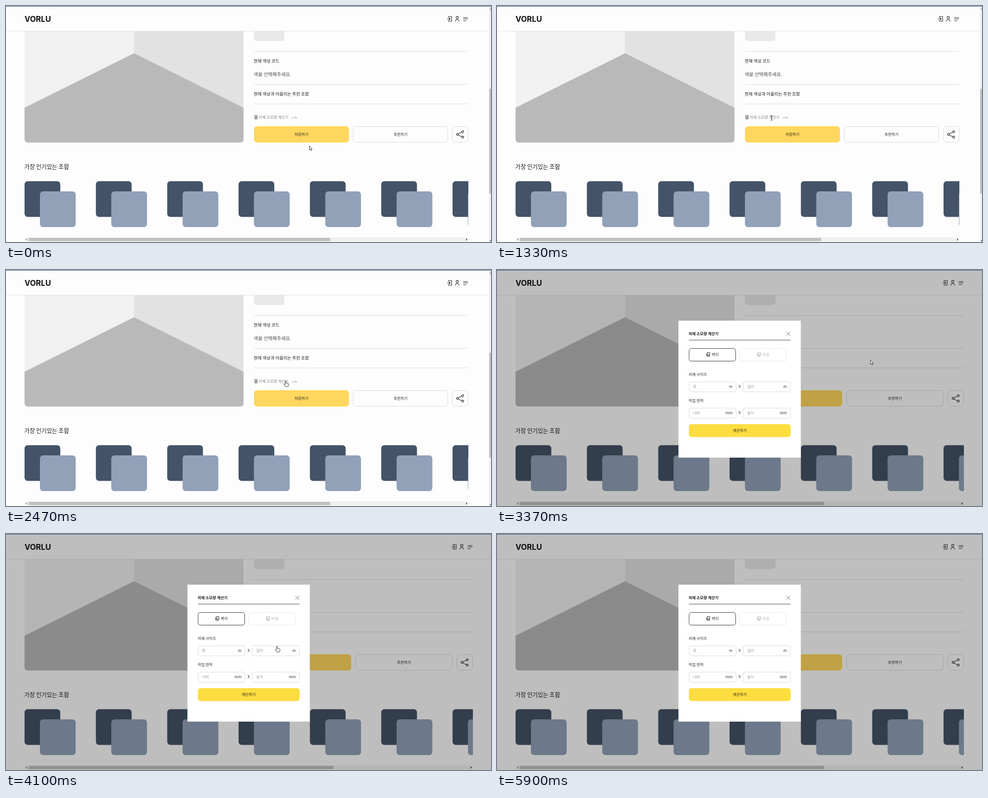
Animation, 1072 px wide and 522 px high, one loop 6460 ms. Source, as an HTML page with a canvas:

```html
<!DOCTYPE html>
<html lang="ko">
<head>
<meta charset="utf-8">
<title>자재 소모량 계산기</title>
<style>
html, body { margin: 0; width: 100%; height: 100%; overflow: hidden; background: #fdfdfd; }
canvas { display: block; }
</style>
</head>
<body>
<canvas id="stage" width="1072" height="522"></canvas>
<script>
const ctx = document.getElementById('stage').getContext('2d');
const W = 1072, H = 522, LOOP = 6460;
const KR = '"Noto Sans CJK KR", "Noto Sans CJK", "Noto Sans KR", sans-serif';
const SMALL = 8.43, MID = 9.49, BODY = 10.54, HEAD = 12.65;

const modalTimes = [[1370, 2130], [2700, 3400], [4100, LOOP]];
const ICONS_LOADED = 1630;

// Pointer path: time, x, y, shape from that time on
const path = [
  [0, 670, 309, 'arrow'], [30, 670, 309, 'arrow'], [670, 703, 292, 'arrow'], [700, 703, 292, 'arrow'],
  [1000, 642, 252, 'ibeam'], [1130, 607, 247, 'ibeam'], [1900, 607, 247, 'ibeam'],
  [1985, 650, 240, 'arrow'], [2100, 706, 227, 'arrow'], [2270, 706, 227, 'arrow'],
  [2380, 643, 242, 'hand'], [2470, 618, 245, 'hand'], [2700, 618, 245, 'hand'],
  [2730, 624, 243, 'arrow'], [3330, 825, 199, 'arrow'], [3400, 825, 199, 'arrow'],
  [3800, 643, 242, 'hand'], [3930, 598, 248, 'hand'], [4100, 598, 248, 'hand'],
  [4130, 630, 240, 'arrow'], [4370, 1085, 150, 'none'],
  [5430, 1005, 178, 'arrow'], [5600, 899, 229, 'arrow'], [5830, 899, 229, 'arrow'],
  [5870, 954, 215, 'arrow'], [5900, 1085, 190, 'none'], [LOOP, 1085, 190, 'none']
];

function rect(x, y, w, h, color) {
  ctx.fillStyle = color;
  ctx.fillRect(x, y, w, h);
}

function round(x, y, w, h, r, fill) {
  ctx.beginPath();
  ctx.roundRect(x, y, w, h, r);
  ctx.fillStyle = fill;
  ctx.fill();
}

function outline(x, y, w, h, r, color) {
  ctx.beginPath();
  ctx.roundRect(x + 0.5, y + 0.5, w - 1, h - 1, r);
  ctx.strokeStyle = color;
  ctx.lineWidth = 1;
  ctx.stroke();
}

function stroke(d, color, width = 1) {
  ctx.strokeStyle = color;
  ctx.lineWidth = width;
  ctx.stroke(new Path2D(d));
}

function poly(points, color) {
  ctx.beginPath();
  points.forEach(([x, y]) => ctx.lineTo(x, y));
  ctx.closePath();
  ctx.fillStyle = color;
  ctx.fill();
}

// cy is the optical middle of the line
function text(s, x, cy, size, color, weight = 400, align = 'left') {
  ctx.font = `${weight} ${size}px ${KR}`;
  ctx.textAlign = align;
  ctx.fillStyle = color;
  ctx.fillText(s, x, cy + size * 0.37);
}

function at(x, y, draw) {
  ctx.save();
  ctx.translate(x, y);
  draw();
  ctx.restore();
}

function header(right, full) {
  rect(0, 55, full, 1, '#e6e6e4');
  ctx.font = '700 17px Inter, sans-serif';
  ctx.textAlign = 'left';
  ctx.fillStyle = '#111';
  ctx.fillText('VORLU', 41, 34.5);
  at(right, 0, () => {
    stroke('M-44 26V23.5H-37V33.5H-44V31M-47 28.5H-40M-42.5 26L-40 28.5L-42.5 31', '#222', 1.1);
    stroke('M-22 25.5a2.6 2.6 0 1 1 -5.2 0a2.6 2.6 0 1 1 5.2 0M-28.8 34.2C-28.8 28.6 -20.4 28.6 -20.4 34.2', '#222', 1.1);
    stroke('M-11.5 25.5H-1M-11.5 28.5H-1M-11.5 32.5H-4.5', '#222', 1.1);
  });
}

function room() {
  ctx.save();
  ctx.beginPath();
  ctx.roundRect(41, 56, 484, 246, [0, 0, 7, 7]);
  ctx.clip();
  rect(41, 56, 242, 246, '#f1f1f2');
  rect(283, 56, 242, 246, '#e2e2e2');
  poly([[41, 225], [283, 104.5], [525, 225], [525, 302], [41, 302]], '#b9b9b9');
  ctx.restore();
}

function details(right) {
  const line = '#dcdce2';
  round(548, 56, 67.5, 21.5, [0, 0, 6, 6], '#e9e9e9');
  [100, 173, 216].forEach(y => rect(548, y, right - 548, 1, line));
  text('현재 색상 코드', 547.6, 121.5, MID, '#1c1c1c', 500);
  text('색을 선택해주세요.', 547.6, 151, BODY, '#4a4a4a', 500);
  text('현재 색상과 어울리는 추천 조합', 547.6, 194.5, MID, '#1c1c1c', 500);

  round(549, 241, 7, 9.5, 1, '#8a8a8a');
  rect(550, 242.2, 5, 1.6, '#eee');
  for (let i = 0; i < 6; i++) rect(550 + i % 3 * 1.9, 245.3 + (i / 3 | 0) * 2.2, 1, 1, '#eee');
  text('자재 소모량 계산기', 558.6, 245.5, SMALL, '#858585');
  stroke('M631 247.5H643L639 244.8', '#999', 0.9);
}

function buttons(right) {
  const w = (right - 548 - 54) / 2;
  const second = right - 45 - w;
  round(548, 266, w, 36, 7, '#ffd75e');
  text('저장하기', 548 + w / 2, 283.7, SMALL, '#2b2718', 400, 'center');
  outline(second, 266, w, 36, 7, '#d8d8e0');
  text('추천하기', second + w / 2, 283.7, SMALL, '#222', 400, 'center');
  outline(right - 36, 266, 36, 36, 7, '#d8d8e0');
  at(right - 18, 284, () => {
    stroke('M-5 -1L4 -5M-5 1L4 5.5', '#222', 1.2);
    [[-6, 0], [5.5, -5.8], [5.5, 6]].forEach(([x, y]) => {
      ctx.beginPath();
      ctx.arc(x, y, 2.1, 0, 7);
      ctx.fillStyle = '#fdfdfd';
      ctx.fill();
      ctx.stroke();
    });
  });
}

function palettes(right) {
  text('가장 인기있는 조합', 40.6, 355.7, HEAD, '#161616', 500);
  ctx.save();
  ctx.beginPath();
  ctx.rect(41, 380, right - 41, 120);
  ctx.clip();
  for (let i = 0; i < 7; i++) {
    const x = 41 + i * 157.67;
    round(x, 387.5, 79, 79, 7, '#445367');
    round(x + 34, 410, 79, 79, 7, '#91a1b8');
  }
  ctx.restore();
  rect(41, 512, right - 41, 9, '#f1f1f1');
  rect(50.5, 512.8, (right - 41) * 0.679, 7.4, '#c1c1c1');
  poly([[47, 514.3], [47, 518.7], [44.3, 516.5]], '#777');
  poly([[right - 5, 514], [right - 5, 519], [right - 2, 516.5]], '#444');
}

function page(modal) {
  const right = modal ? 1032 : 1022;
  const full = modal ? W : 1067;
  rect(0, 0, W, H, '#fdfdfd');
  header(right, full);
  room();
  details(right);
  buttons(right);
  palettes(right);
  if (!modal) {
    rect(1067, 1, 5, 521, '#f1f1f1');
    rect(1068, 183, 4, 232, '#c1c1c1');
    poly([[1069, 8], [1072, 8], [1072, 5]], '#777');
    poly([[1069, 518], [1072, 518], [1072, 521]], '#444');
  }
}

function tab(x, label, color, border, icons) {
  const mid = x + 52;
  outline(x, 173, 104, 29, 5, border);
  if (icons) {
    stroke(`M${mid - 11} 182.5h5.5v6.5h-5.5zM${mid - 12.5} 184v7h7.5M${mid - 9.5} 187h3`, color, 1);
    text(label, mid - 1.3, 187, SMALL, color);
  } else {
    text(label, mid, 187, SMALL, color, 400, 'center');
  }
}

function field(x, y, label, unit, r) {
  outline(x, y, 105, 23, r, '#d8d8e0');
  text(label, x + 9, y + 11, SMALL, '#9a9a9a');
  text(unit, x + 96.5, y + 11, SMALL, '#333', 400, 'right');
}

function dialog(icons) {
  rect(401, 112, 270.5, 303, '#fff');
  text('자재 소모량 계산기', 423.6, 141, SMALL, '#1a1a1a', 600);
  stroke('M639.5 136.5L648.5 145.5M648.5 136.5L639.5 145.5', '#777', 1);
  rect(424, 154.5, 225, 1, '#3a3a3a');
  tab(424, '벽지', '#2c2c2c', '#333', icons);
  tab(536, '타일', '#b0b0b0', '#e9e9ec', icons);
  const rows = [[247, '자재 사이즈', '폭', '길이', 'm'], [305, '작업 면적', '너비', '높이', 'mm']];
  rows.forEach(([y, title, a, b, unit]) => {
    text(title, 423.6, y - 16.5, SMALL, '#2a2a2a');
    field(424, y, a, unit, 4);
    text('X', 536.5, y + 11, SMALL, '#333', 400, 'center');
    field(544, y, b, unit, 1);
  });
  round(424, 341, 225, 28.5, 6, '#fddd40');
  text('계산하기', 536.5, 354.7, SMALL, '#2b2718', 400, 'center');
}

const shapes = {
  arrow: new Path2D('M0.5 0.5V9.6L2.6 7.7L4 10.8L5.5 10.1L4.1 7.2H6.8Z'),
  hand: new Path2D('M-1 1Q0 -0.6 1 1V5.3Q2.2 4.4 3 5.5Q4.2 4.8 4.9 6Q6.6 5.6 6.6 7.4V10L5.4 13H-0.2L-3 9Q-4.2 7 -2.6 6.9L-1 8.3Z')
};

function pointer(t) {
  const i = path.findIndex((p, n) => n > 0 && t < p[0]);
  const [t0, x0, y0, kind] = path[i - 1];
  const [t1, x1, y1] = path[i];
  if (kind === 'none') return;
  const k = (t - t0) / (t1 - t0);
  at(Math.round(x0 + (x1 - x0) * k), Math.round(y0 + (y1 - y0) * k), () => {
    if (kind === 'ibeam') {
      stroke('M-2.5 -4.5H-0.5M0.5 -4.5H2.5M0 -4V5M-2.5 5.5H-0.5M0.5 5.5H2.5', '#222', 1);
      return;
    }
    ctx.fillStyle = '#fff';
    ctx.fill(shapes[kind]);
    ctx.strokeStyle = '#222';
    ctx.lineWidth = 0.9;
    ctx.stroke(shapes[kind]);
  });
}

function draw(t) {
  const modal = modalTimes.some(([from, to]) => t >= from && t < to);
  page(modal);
  if (modal) {
    rect(0, 0, W, H, 'rgba(0,0,0,.25)');
    dialog(t >= ICONS_LOADED);
  }
  rect(0, 0, W, 1, '#3355a0');
  pointer(t);
}

const start = performance.now();
function frame() {
  draw((performance.now() - start) % LOOP);
  requestAnimationFrame(frame);
}
frame();
</script>
</body>
</html>
```
